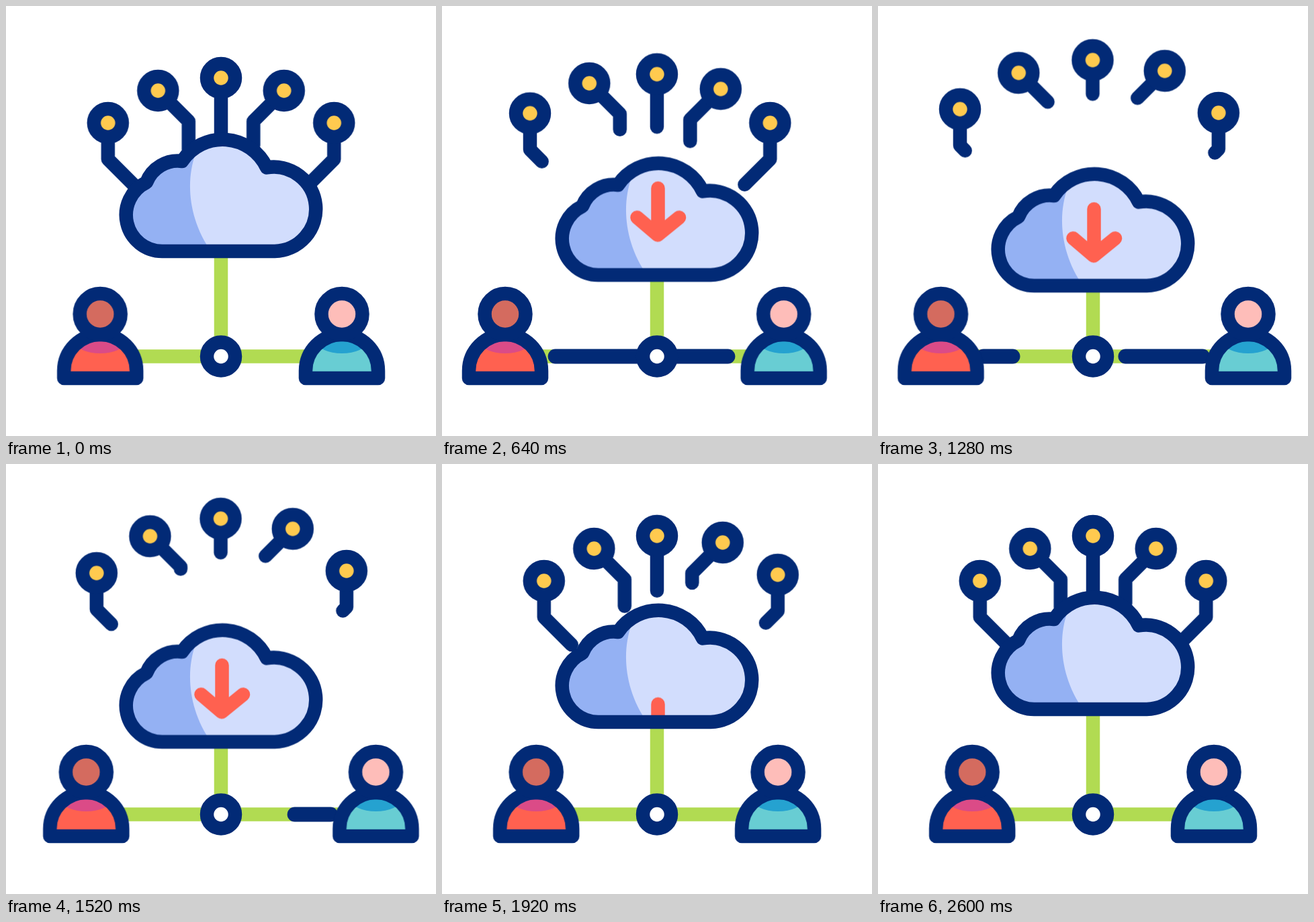
An HTML page for the animation above (3000 ms loop, 640 by 640 pixels).

```html
<!DOCTYPE html>
<html lang="en">
<head>
<meta charset="utf-8">
<title>Cloud network</title>
<style>
  html, body { margin: 0; width: 100%; height: 100%; overflow: hidden; background: #fff; }
  svg { display: block; width: 100vw; height: 100vh; }

  .ink { fill: none; stroke: #022a76; stroke-width: 20.5; stroke-linecap: round; stroke-linejoin: round; }
  .wire { fill: none; stroke: #b1db52; stroke-width: 20.5; }
  .flow { stroke-width: 22; stroke-dasharray: 163 400; }
  .arrow { fill: none; stroke: #ff6150; stroke-width: 20.5; stroke-linecap: round; stroke-linejoin: round; }
  .dot { fill: #ffca4f; }
  .stem { stroke-dasharray: var(--len) 400; }

  .move { animation: 3s cubic-bezier(.3333, 0, .6667, 1) infinite; }

  /* people and the data flowing to them */
  #left { animation-name: left; }
  #right { animation-name: right; }
  #flowL { animation-name: flow-left; }
  #flowR { animation-name: flow-right; }
  @keyframes left {
    0%, 60%, 100% { transform: translate(0, 0); }
    26.67%, 38.67% { transform: translate(-51.5px, 0); }
  }
  @keyframes right {
    0%, 16.5%, 64.53%, 100% { transform: translate(0, 0); }
    35%, 49.87% { transform: translate(51px, 0); }
  }
  @keyframes flow-left {
    0%, 11.33% { stroke-dashoffset: 163px; }
    23.33% { stroke-dashoffset: 0px; }
    52.63%, 100% { stroke-dashoffset: -163px; }
  }
  @keyframes flow-right {
    0%, 9.33% { stroke-dashoffset: 163px; }
    29.43%, 31.4% { stroke-dashoffset: 0px; }
    62.67%, 100% { stroke-dashoffset: -163px; }
  }

  /* cloud */
  #cloud { animation-name: cloud; }
  #arrow { animation-name: arrow; }
  @keyframes cloud {
    0%, 76.33%, 100% { transform: translate(0, 0); }
    34%, 46.5% { transform: translate(0, 51.3px); }
  }
  @keyframes arrow {
    0%, 6.67% { transform: translate(0, -130px); }
    25.33%, 53.33% { transform: translate(0, 0); }
    70.67%, 100% { transform: translate(0, 130px); }
  }

  /* nodes drift outwards while their stems shorten */
  #n1 { --x: -30.3px; --y: -20.8px; --len: 112px; --cut: 48px; animation-name: node1; }
  #n2 { --x: -17px; --y: -26.5px; --len: 106.3px; --cut: 45px; animation-name: node2; }
  #n3 { --x: -.5px; --y: -26.5px; --len: 86px; --cut: 35.5px; animation-name: node3; }
  #n4 { --x: 13px; --y: -29.5px; --len: 100.3px; --cut: 43px; animation-name: node4; }
  #n5 { --x: 18.6px; --y: -15px; --len: 107.7px; --cut: 46px; animation-name: node5; }
  #n1 .stem { animation-name: stem1; }
  #n2 .stem { animation-name: stem2; }
  #n3 .stem { animation-name: stem3; }
  #n4 .stem { animation-name: stem4; }
  #n5 .stem { animation-name: stem5; }
  @keyframes node1 {
    0%, 8.17%, 62.07%, 100% { transform: translate(0, 0); }
    29.17%, 41.07% { transform: translate(var(--x), var(--y)); }
  }
  @keyframes node2 {
    0%, 12.07%, 64.07%, 100% { transform: translate(0, 0); }
    33.07%, 43.07% { transform: translate(var(--x), var(--y)); }
  }
  @keyframes node3 {
    0%, 15.17%, 64.7%, 100% { transform: translate(0, 0); }
    36.17%, 49.03% { transform: translate(var(--x), var(--y)); }
  }
  @keyframes node4 {
    0%, 17.83%, 71.83%, 100% { transform: translate(0, 0); }
    37.5%, 50.83% { transform: translate(var(--x), var(--y)); }
  }
  @keyframes node5 {
    0%, 20.67%, 76.23%, 100% { transform: translate(0, 0); }
    41.67%, 55.23% { transform: translate(var(--x), var(--y)); }
  }
  @keyframes stem1 {
    0%, 8.17%, 62.07%, 100% { stroke-dashoffset: 0px; }
    29.17%, 41.07% { stroke-dashoffset: var(--cut); }
  }
  @keyframes stem2 {
    0%, 12.07%, 66.73%, 100% { stroke-dashoffset: 0px; }
    33.07%, 45.73% { stroke-dashoffset: var(--cut); }
  }
  @keyframes stem3 {
    0%, 15.17%, 67.37%, 100% { stroke-dashoffset: 0px; }
    36.17%, 51.7% { stroke-dashoffset: var(--cut); }
  }
  @keyframes stem4 {
    0%, 17.83%, 74.5%, 100% { stroke-dashoffset: 0px; }
    37.5%, 53.5% { stroke-dashoffset: var(--cut); }
  }
  @keyframes stem5 {
    0%, 20.67%, 76.23%, 100% { stroke-dashoffset: 0px; }
    41.67%, 55.23% { stroke-dashoffset: var(--cut); }
  }
</style>
</head>
<body>
<svg viewBox="0 0 640 640">
  <defs>
    <path id="cloudShape" d="M232.5 365A54 54 0 0 1 209 262.5A50 50 0 0 1 262 231A72.5 72.5 0 0 1 388 240.5A62.7 62.7 0 1 1 400 365Z"/>
    <path id="bodyShape" d="M-54 554V543A54 54 0 0 1 54 543V554Z"/>
    <clipPath id="inCloud"><use href="#cloudShape"/></clipPath>
    <clipPath id="inBody"><use href="#bodyShape"/></clipPath>
    <g id="knob">
      <circle class="dot" r="21"/>
      <circle class="ink" r="21"/>
    </g>
  </defs>

  <path class="wire" d="M320 340V521.5M140 521.5H500"/>
  <path id="flowL" class="ink flow move" d="M320 521.5H157"/>
  <path id="flowR" class="ink flow move" d="M320 521.5H483"/>
  <circle class="ink" cx="320" cy="521.5" r="21" style="fill:#fff"/>

  <g transform="translate(140.2 0)">
    <g id="left" class="move">
      <use href="#bodyShape" fill="#ff6150"/>
      <ellipse cy="500" rx="37" ry="17" fill="#db4b87" clip-path="url(#inBody)"/>
      <use href="#bodyShape" class="ink"/>
      <circle class="ink" cy="458.5" r="30.5" style="fill:#d46b5f"/>
    </g>
  </g>
  <g transform="translate(499.9 0)">
    <g id="right" class="move">
      <use href="#bodyShape" fill="#68cdd3"/>
      <ellipse cy="500" rx="37" ry="17" fill="#25a2d0" clip-path="url(#inBody)"/>
      <use href="#bodyShape" class="ink"/>
      <circle class="ink" cy="458.5" r="30.5" style="fill:#febdb9"/>
    </g>
  </g>

  <g transform="translate(151.8 174)">
    <g id="n1" class="move"><path class="ink stem move" d="M0 0V54l41 41"/><use href="#knob"/></g>
  </g>
  <g transform="translate(226.3 126)">
    <g id="n2" class="move"><path class="ink stem move" d="M0 0L45.5 45.5v42"/><use href="#knob"/></g>
  </g>
  <g transform="translate(320 107)">
    <g id="n3" class="move"><path class="ink stem move" d="M0 0V86"/><use href="#knob"/></g>
  </g>
  <g transform="translate(413.7 126)">
    <g id="n4" class="move"><path class="ink stem move" d="M0 0L-45.5 45.5v36"/><use href="#knob"/></g>
  </g>
  <g transform="translate(488.2 174)">
    <g id="n5" class="move"><path class="ink stem move" d="M0 0V54l-38 38"/><use href="#knob"/></g>
  </g>

  <g id="cloud" class="move">
    <g clip-path="url(#inCloud)">
      <path fill="#94b1f3" d="M160 180H480V380H160Z"/>
      <path fill="#d2ddfd" d="M288 190L282 220C267 262 272 318 305 365V380H480V190Z"/>
      <path id="arrow" class="arrow move" d="M321.5 251V318M290.5 294.5L321 320.5L353 294.5"/>
    </g>
    <use href="#cloudShape" class="ink"/>
  </g>
</svg>
</body>
</html>
```
